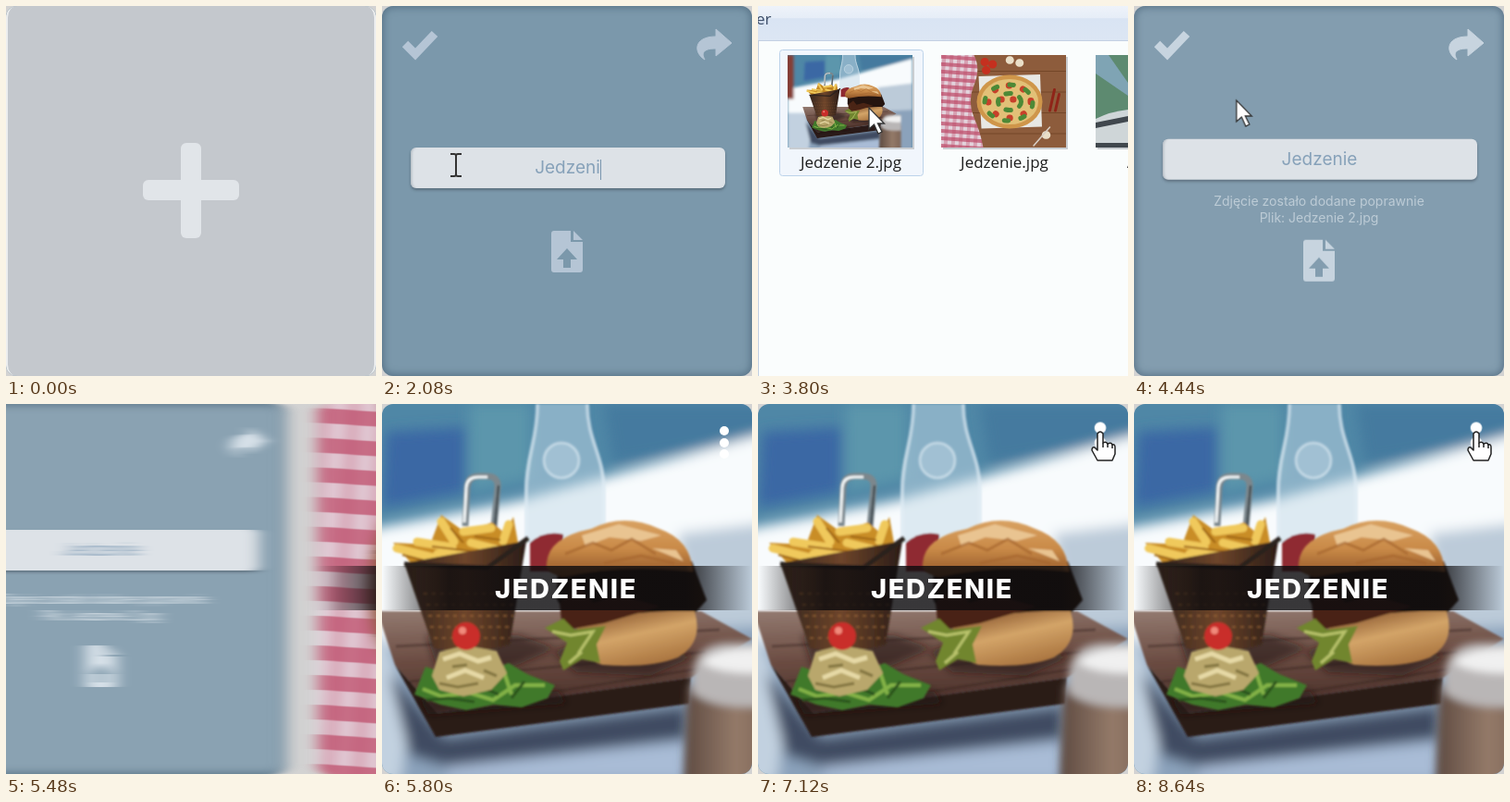
An HTML page without scripts that plays this animation: 400 px wide and 400 px high, repeating every 8680 ms.

```html
<!DOCTYPE html>
<html lang="pl">
<head>
<meta charset="utf-8">
<title>Dodawanie kategorii</title>
<style>
  html, body { margin: 0; width: 100%; height: 100%; overflow: hidden; background: #d2d2d2; }
  .stage { position: absolute; left: 0; top: 0; width: 400px; height: 400px; overflow: hidden; background: #d2d2d2; font-family: Inter, sans-serif; }
  .stage * { box-sizing: border-box; animation-duration: 8.68s; animation-iteration-count: infinite; animation-timing-function: linear; }
  svg { position: absolute; left: 0; top: 0; display: block; }
  .card { position: absolute; top: 0; width: 400px; height: 400px; border-radius: 12px; overflow: hidden; }

  /* carousel */
  .track { position: absolute; width: 1268px; height: 400px; animation-name: slide, smear; }
  @keyframes slide {
    0%, 61.75% { transform: none; animation-timing-function: cubic-bezier(.5, 0, .8, .6); }
    63.13% { transform: translateX(-94px); animation-timing-function: cubic-bezier(.3, .28, .6, 1); }
    66.7%, 100% { transform: translateX(-868px); }
  }
  @keyframes smear {
    0%, 62.2% { filter: none; }
    62.21%, 65.9% { filter: url(#smear); }
    65.91%, 100% { filter: none; }
  }

  /* form */
  .form { left: 0; background: #7b98ab; box-shadow: inset 0 0 9px 1px rgba(55, 82, 104, .6); color: #b5c5d5; animation-name: lighten; }
  @keyframes lighten { 0%, 49% { background: #7b98ab; color: #b5c5d5; } 53%, 100% { background: #8aa2b2; color: #d6e0e8; } }
  .field { position: absolute; left: 31px; top: 153px; width: 340px; height: 44px; border-radius: 6px; background: #dde2e7; box-shadow: 0 2px 3px rgba(50, 60, 70, .45), inset 3px 0 3px -2px #a9b2ba; color: #86a1b9; line-height: 44px; text-align: center; animation-name: raise; }
  .field b { font-weight: 400; font-size: 0; animation-name: type; animation-delay: calc(var(--i) * 80ms); }
  .field i { display: inline-block; width: 1px; height: 22px; background: #7895ae; vertical-align: middle; animation-name: caret; }
  .file { animation-name: lower; }
  .note { position: absolute; top: 202px; width: 100%; text-align: center; font-size: 14px; line-height: 18px; color: #eef3f7; animation-name: note; }
  @keyframes raise { 0%, 49% { transform: none; } 53%, 100% { transform: translateY(-17px); } }
  @keyframes lower { 0%, 49% { transform: none; } 53%, 100% { transform: translateY(18px); } }
  @keyframes note { 0%, 49% { opacity: 0; } 53%, 100% { opacity: 1; } }
  @keyframes type { 0%, 18.37% { font-size: 0; } 18.38%, 100% { font-size: 19px; } }
  @keyframes caret { 0%, 16.1% { opacity: 0; } 16.11%, 34.5% { opacity: 1; } 34.51%, 100% { opacity: 0; } }

  .add { left: 0; background: #c4c8cd; border: solid #eceeef; border-width: 0 2px; animation-name: dissolve; }
  @keyframes dissolve { 0%, 8.75% { opacity: 1; } 11.5%, 100% { opacity: 0; } }

  /* finished tiles */
  .label { position: absolute; top: 175px; width: 100%; height: 48px; line-height: 49px; text-align: center; text-indent: -2px; color: #fff; font-size: 29px; font-weight: 800; letter-spacing: .055em; background: linear-gradient(90deg, transparent, rgba(14, 12, 14, .82) 18%, rgba(14, 12, 14, .82) 82%, transparent); }
  .dots { transform-origin: 370px 42px; animation-name: grow; }
  @keyframes grow { 0%, 77.5% { transform: none; } 79%, 100% { transform: scale(1.25); } }

  /* file picker */
  .picker { position: absolute; width: 400px; height: 400px; background: #fafdfd; opacity: 0; animation-name: picker; font: 17px "Open Sans", sans-serif; }
  @keyframes picker { 0%, 39.62% { opacity: 0; } 39.63%, 48.85% { opacity: 1; } 48.86%, 100% { opacity: 0; } }
  .hover { animation-name: hover; }
  @keyframes hover { 0%, 42.5% { opacity: 0; } 43.2%, 100% { opacity: 1; } }

  /* pointer */
  .pointer { position: absolute; width: 0; height: 0; animation-name: move; }
  .pointer svg { overflow: visible; }
  .pointer g { animation-timing-function: step-end; }
  .hand { animation-name: hand; }
  .arrow { animation-name: arrow; }
  .beam { animation-name: beam; }
  @keyframes move {
    0%, 2.3% { transform: translate(250px, 430px); animation-timing-function: ease-in-out; }
    7.4%, 11% { transform: translate(200px, 200px); animation-timing-function: ease-in-out; }
    15.7%, 29% { transform: translate(80px, 172px); animation-timing-function: ease-in-out; }
    34.1%, 39.6% { transform: translate(200px, 264px); animation-timing-function: ease-in-out; }
    43.3%, 49.3% { transform: translate(120px, 110px); animation-timing-function: ease-in-out; }
    57.1%, 60.8% { transform: translate(41px, 41px); }
    60.81%, 69.6% { transform: translate(250px, 430px); animation-timing-function: ease-in-out; }
    78.4%, 100% { transform: translate(370px, 30px); }
  }
  @keyframes hand { 0% { opacity: 1; } 12% { opacity: 0; } 32.5% { opacity: 1; } 39.63% { opacity: 0; } 56% { opacity: 1; } 60.8% { opacity: 0; } 77.6% { opacity: 1; } 100% { opacity: 1; } }
  @keyframes arrow { 0% { opacity: 0; } 12% { opacity: 1; } 13.4% { opacity: 0; } 30.8% { opacity: 1; } 32.5% { opacity: 0; } 39.63% { opacity: 1; } 56% { opacity: 0; } 69.6% { opacity: 1; } 77.6%, 100% { opacity: 0; } }
  @keyframes beam { 0% { opacity: 0; } 13.4% { opacity: 1; } 30.8%, 100% { opacity: 0; } }
</style>
</head>
<body>
<div class="stage">
  <svg width="0" height="0">
    <defs>
      <filter id="smear" x="0" y="0" width="1" height="1" color-interpolation-filters="sRGB"><feGaussianBlur stdDeviation="8 0"/></filter>
      <filter id="soft"><feGaussianBlur stdDeviation="1.2"/></filter>
      <filter id="hazy"><feGaussianBlur stdDeviation="4"/></filter>
      <filter id="far"><feGaussianBlur stdDeviation="7"/></filter>
      <linearGradient id="bun" x2="0" y2="1"><stop stop-color="#d9a262"/><stop offset=".5" stop-color="#c98a48"/><stop offset="1" stop-color="#8f5426"/></linearGradient>
      <linearGradient id="base" x1=".1" x2=".6" y2="1"><stop stop-color="#7d4a26"/><stop offset=".5" stop-color="#d3a468"/><stop offset="1" stop-color="#a9743f"/></linearGradient>
      <linearGradient id="wood" x2=".15" y2="1"><stop stop-color="#937a70"/><stop offset=".5" stop-color="#6b4c42"/><stop offset="1" stop-color="#482e28"/></linearGradient>
      <linearGradient id="basket"><stop stop-color="#33241d"/><stop offset=".5" stop-color="#6e452a"/><stop offset="1" stop-color="#2a1c17"/></linearGradient>
      <linearGradient id="shaker"><stop stop-color="#5d4a41"/><stop offset=".6" stop-color="#947a69"/><stop offset="1" stop-color="#7e6657"/></linearGradient>
      <linearGradient id="bar" x2="0" y2="1"><stop stop-color="#eef3fa"/><stop offset=".34" stop-color="#e6edf7"/><stop offset=".36" stop-color="#d9e4f3"/><stop offset="1" stop-color="#dce6f3"/></linearGradient>
      <pattern id="check" width="32" height="32" y="4" patternUnits="userSpaceOnUse" patternTransform="rotate(4)">
        <path fill="#e3d3dc" d="M0 0h32v32H0z"/><path fill="#bd4766" fill-opacity=".7" d="M0 0h32v16H0z"/><path fill="#bd4766" fill-opacity=".35" d="M0 0h16v32H0z"/>
      </pattern>

      <g id="burger">
        <path fill="#4f87a6" d="M-70 0h540v400H-70z"/>
        <g filter="url(#far)">
          <path fill="#3a68a4" d="M5 30l85-5v70L0 112z"/>
          <path fill="#5c96ac" d="M95 0h65v80l-65 15z"/>
          <path fill="#447a9f" d="M240 0h230v28L250 65z"/>
          <path fill="#f8fbfd" d="M-70 146L150 104 470 16v190l-200 60H-70z"/>
          <path fill="#bccbd9" d="M320 140l150-18v150H340z"/>
          <path fill="#853c36" d="M-80 0h36v190h-36z"/>
          <path fill="#8ba2bb" d="M-70 262l540-25v175H-70z"/>
          <path fill="#c2d1e0" d="M-70 250h74l26 90-10 70h-90z"/>
          <path fill="#3f4c62" d="M8 290l60 70 262-34v36L70 392 30 380z"/>
          <path fill="#a9bcd6" d="M70 392l258-26v40H70z"/>
        </g>
        <g filter="url(#soft)">
          <path fill="#c4d9e8" fill-opacity=".5" d="M167 0h56c0 40 19 55 19 95v55h-88V95c0-40 13-55 13-95z"/>
          <path fill="none" stroke="#e6f0f7" stroke-opacity=".55" stroke-width="4" d="M168 0c0 40-12 55-12 95v48M222 0c0 40 18 55 18 95v42"/>
          <circle cx="194" cy="61" r="19" fill="#e4eff7" fill-opacity=".25" stroke="#eaf3f9" stroke-opacity=".5" stroke-width="3"/>
          <path fill="#8f2a31" d="M160 150q16-14 36-9v40h-36z"/>
          <path fill="url(#wood)" d="M-5 224h350l55 30-66 42L60 334 14 282z"/>
          <path fill="none" stroke="#38241f" stroke-opacity=".45" stroke-width="3" d="M15 262l350-18M30 300l320-32M130 320l220-35"/>
          <path fill="#2a1a18" d="M14 282l46 52 274-38-2 28L58 360z"/>
        </g>
        <g filter="url(#hazy)" fill="#21130f" fill-opacity=".55">
          <path d="M48 250h100l40 14-50 22H60zM185 268l30-12 125 16-50 22-80-4z"/>
          <path d="M40 318l150-8 10 14-150 12z"/>
        </g>
        <g filter="url(#soft)">
          <path fill="none" stroke="#7c878d" stroke-width="7" stroke-linejoin="round" d="M90 132l2-42q1-12 13-12h8q13 0 12 12l-4 44"/>
          <path fill="none" stroke="#f2f6f7" stroke-width="3" d="M89 128l2-38q1-11 13-11h10"/>
          <path fill="none" stroke="#333c40" stroke-width="2" d="M126 88l-4 44"/>
          <path fill="#c98d25" d="M12 150l40 2 12-32 25 18 30-10 14 12 9-18 5 28-4 26H35z"/>
          <path fill="none" stroke="#f0c95b" stroke-width="9" stroke-linecap="round" d="M16 156l40 10M38 149l38 6M64 127l14 22M88 138l30-4M137 130l-6 18M60 162l58 2M96 150l32 8"/>
          <path fill="none" stroke="#9c6415" stroke-width="2" d="M22 163l34 9M54 154l50 6M74 134l14 16M100 143l28 4M84 168l40 2"/>
          <path fill="url(#basket)" d="M24 172l132-24-18 112q-41 12-82 4z"/>
          <path fill="none" stroke="#a76d3a" stroke-opacity=".55" stroke-width="2" stroke-dasharray="4 5" d="M45 205h98M48 217h94M50 229h92M52 241h88M56 253h82"/>
          <path fill="none" stroke="#2b211e" stroke-width="5" d="M24 173l90 4 44-32"/>
          <path fill="#24140f" d="M190 170h145l16 42-18 20-130 4-14-25z"/>
          <path fill="url(#base)" d="M210 236q70-14 128-12 10 34-18 50-30 12-82 8-24-6-28-46z"/>
          <path fill="url(#bun)" d="M178 172q2-28 48-37 36-18 74 0 34 12 36 46-80-8-140 6-20-4-18-15z"/>
          <path fill="#e9c491" d="M216 142l40-12 46 12-22 6-34-4-26 10zM292 156l26 2 8 12z"/>
          <path fill="none" stroke="#a5652e" stroke-opacity=".7" stroke-width="3" d="M198 162l30-12 20 8 22-12 26 16M240 172l40-8 36 8"/>
          <path fill="#4a2415" d="M192 215l22-18 14 18 30-8 42 12-60 18-45 8z"/>
          <path fill="#71862f" d="M176 242l20-10 12 12 34-4-10 20 4 20-20-4-20 12-4-10 8-20z"/>
          <path fill="none" stroke="#b9c36c" stroke-width="3" d="M184 246l20 4 24-4-16 24M202 280l14-12"/>
          <path fill="#41792b" d="M35 314l12-30 42 14 48-18 20 12 30 12-8 14-28 10-30-3-30 6-28-6z"/>
          <path fill="none" stroke="#83b247" stroke-width="4" d="M44 308l20 8 30-4 26 8 24-16 32 0M132 290l8 24"/>
          <path fill="none" stroke="#2a521d" stroke-width="3" d="M48 320l24-2 28 4M140 318l14-18M112 308l14 6"/>
          <path fill="#b9a76c" d="M54 294l8-26 28-7 34 6 11 24-17 18-30 7-26-7z"/>
          <path fill="none" stroke="#e6d9a6" stroke-width="5" d="M66 276l18-6 20 8 14-4M70 296l20-8 20 8"/>
          <path fill="none" stroke="#82743f" stroke-width="3" d="M62 302l20 4 22-4M76 284l16-2M110 288l14 6"/>
          <circle cx="91" cy="251" r="15" fill="#c92d29"/><circle cx="87" cy="245" r="4" fill="#f08a7c"/>
        </g>
        <g filter="url(#hazy)">
          <path fill="url(#shaker)" d="M330 304h90v106h-94z"/>
          <path fill="#b9b6b6" d="M336 290q4-32 40-32h44v68q-60 6-84-14z"/>
          <path fill="#f0f0f0" d="M346 280q12-18 74-16v26q-50 4-74-10z"/>
        </g>
      </g>

      <g id="pizza">
        <path fill="#8d5c3c" d="M-70 0h540v400H-70z"/>
        <path stroke="#744728" stroke-width="4" d="M-70 70h540M-70 160h540M-70 250h540M-70 340h540"/>
        <path fill="url(#check)" d="M-70 0H72q30 60 0 130t0 140 40 130H-70z"/>
        <g filter="url(#soft)">
          <path fill="#e8e8e4" d="M92 92l266-8 8 226-262 8z"/>
          <ellipse cx="226" cy="202" rx="142" ry="116" fill="#cf964a"/>
          <ellipse cx="226" cy="202" rx="124" ry="98" fill="#e2c077"/>
          <g fill="none" stroke-linecap="round">
            <g stroke="#c7402a" stroke-width="28"><ellipse cx="226" cy="202" rx="92" ry="70" stroke-dasharray="1 62"/><path stroke-dasharray="1 50" d="M190 192h90"/></g>
            <g stroke="#4d8936" stroke-width="20"><ellipse cx="222" cy="206" rx="104" ry="78" stroke-dasharray="18 54"/><ellipse cx="226" cy="202" rx="50" ry="36" stroke-dasharray="22 40"/></g>
            <path stroke="#c5301f" stroke-width="36" d="M118 30h1M152 40h1M124 66h1"/>
            <path stroke="#eadfc8" stroke-width="34" d="M226 22h2M268 34h2M382 346h4"/>
            <path stroke="#8f2418" stroke-width="12" d="M420 150l-20 90M440 170l-16 70"/>
            <path stroke="#d8cfc6" stroke-width="6" d="M330 392l70-80"/>
          </g>
        </g>
      </g>
    </defs>
  </svg>

  <div class="track">
    <div class="card form">
      <svg width="400" height="400" fill="currentColor">
        <path d="M25 41l11 11 21-22" fill="none" stroke="currentColor" stroke-width="9"/>
        <path d="M361 25l17 15-17 14v-8c-11 0-17 3-12 12-12-7-13-25 12-25z" stroke="currentColor" stroke-linejoin="round"/>
        <path class="file" fill-rule="evenodd" d="M186 243h18v12h13v30q0 3-3 3h-28q-3 0-3-3v-39q0-3 3-3zM207 243l10 10h-10zM200 262l-11 12h7v9h8v-9h7z"/>
      </svg>
      <div class="field"><b style="--i:0">J</b><b style="--i:1">e</b><b style="--i:2">d</b><b style="--i:3">z</b><b style="--i:4">e</b><b style="--i:5">n</b><b style="--i:6">i</b><b style="--i:7">e</b><i></i></div>
      <div class="note">Zdjęcie zostało dodane poprawnie<br>Plik: Jedzenie 2.jpg</div>
    </div>
    <div class="card add">
      <svg width="400" height="400" style="left:-2px" fill="#e1e5e9"><rect x="148" y="188" width="104" height="22" rx="6"/><rect x="189" y="148" width="22" height="103" rx="6"/></svg>
    </div>
    <div class="card" style="left:434px">
      <svg width="400" height="400"><use href="#pizza"/></svg>
      <div class="label">JEDZENIE</div>
    </div>
    <div class="card" style="left:868px">
      <svg width="400" height="400"><use href="#burger"/></svg>
      <div class="label">JEDZENIE</div>
      <svg width="400" height="400"><g class="dots" fill="#fff"><circle cx="370" cy="29" r="5"/><circle cx="370" cy="42" r="5"/><circle cx="370" cy="54" r="5"/></g></svg>
    </div>
  </div>

  <div class="picker">
    <svg width="400" height="400" fill="#1c1c1c" text-anchor="middle">
      <path fill="url(#bar)" d="M0 0h400v38H0z"/>
      <path stroke="#c3d0e2" d="M0 37.5h400M.5 38v362"/>
      <text x="-2" y="20" text-anchor="start" fill="#3a4c68">er</text>
      <rect class="hover" x="23.5" y="47.5" width="155" height="136" rx="3" fill="#f1f6fc" stroke="#bcd3ea"/>
      <g fill="#c9cdd1"><path d="M34 55h135v100H34zM200 55h135v100H200zM367 55h40v100h-40z"/></g>
      <svg x="32" y="53" width="135" height="100" viewBox="-70 0 540 400"><use href="#burger"/></svg>
      <svg x="198" y="53" width="135" height="100" viewBox="-70 0 540 400"><use href="#pizza"/></svg>
      <path fill="#5d8a70" d="M365 53h35v100h-35z"/>
      <path fill="#7fa4b4" d="M365 53h14l21 30v14l-35-24z"/>
      <path fill="#cfd6d8" d="M365 122q16-8 35-10v41h-35z"/>
      <path fill="#41484e" d="M365 126l35-7v6l-35 7zM365 148h35v5h-35z"/>
      <text x="100.5" y="175">Jedzenie 2.jpg</text>
      <text x="266.5" y="175">Jedzenie.jpg</text>
      <text x="432" y="175">Auto.jpg</text>
    </svg>
  </div>

  <div class="pointer">
    <svg width="1" height="1">
      <g class="hand" fill="#fff" stroke="#222" stroke-width="1.5" stroke-linejoin="round">
        <path d="M-3 2q3-4 6 0v10q3-2 5 1 4-2 5 1 3-1 3 3v7l-3 7H-3l-6-11q0-4 3-3l3 3z"/>
        <path fill="none" d="M3 12v5M8 13v4M13 14v4"/>
      </g>
      <g class="arrow"><path fill="#fff" stroke="#333" stroke-width="1.3" d="M0 0v23l5.500-5 4.500 10 4-2-4.500-9h7z"/></g>
      <g class="beam"><path fill="none" stroke="#333" stroke-width="2" d="M-6-12h4q2 0 2 2 0-2 2-2h4M0-10v20M-6 12h4q2 0 2-2 0 2 2 2h4"/></g>
    </svg>
  </div>
</div>
</body>
</html>
```
